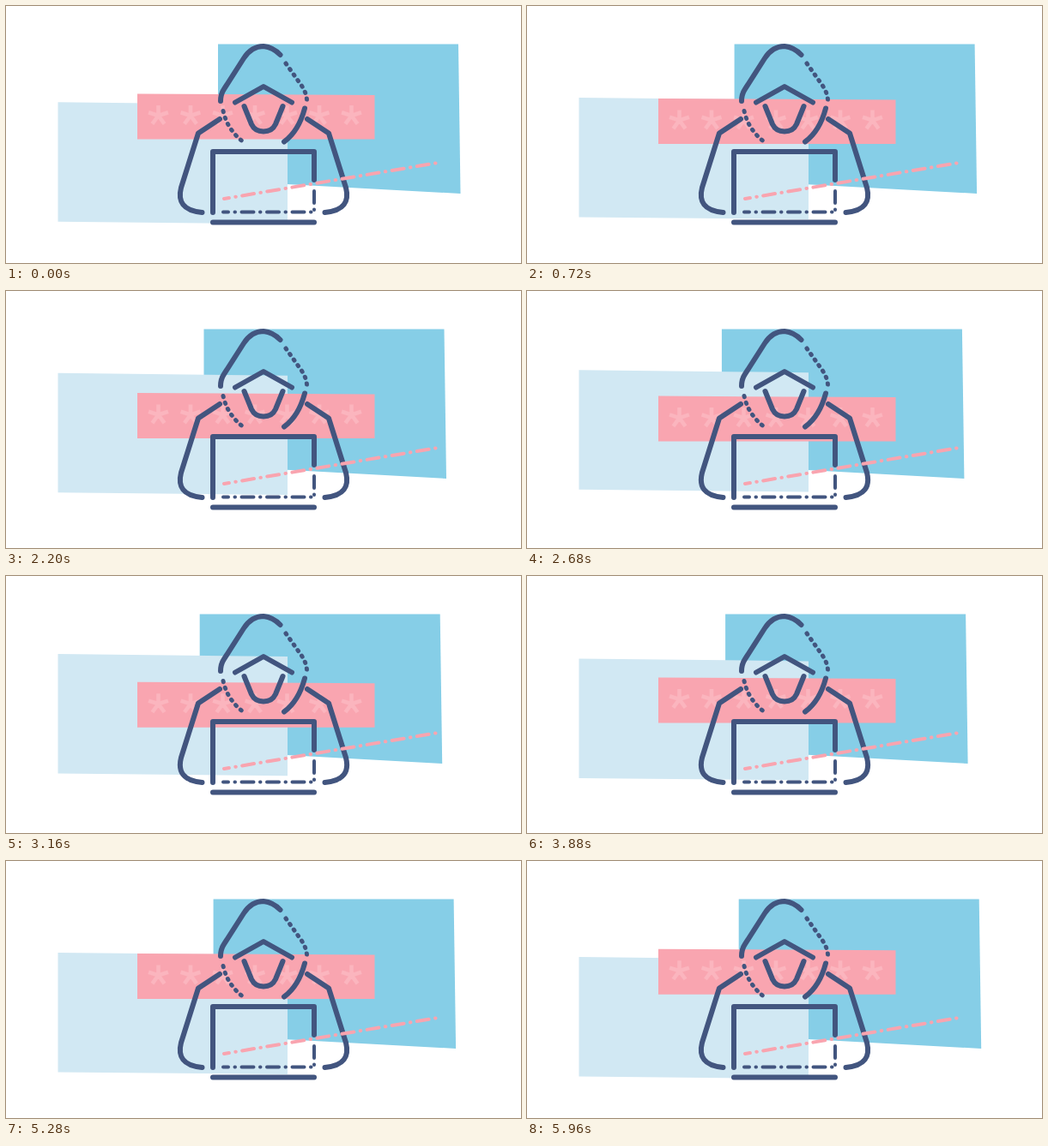
Write an HTML page that moves like this. It is 600x300 px and loops after 6 s.

```html
<!DOCTYPE html>
<html lang="en">
<head>
<meta charset="utf-8">
<title>Hooded figure at a laptop</title>
<style>
  html, body { margin: 0; width: 100%; height: 100%; overflow: hidden; background: #fff; }
  svg { display: block; width: 600px; height: 300px; }
  .ink { fill: none; stroke: #42557f; stroke-width: 6; stroke-linecap: round; stroke-linejoin: round; }
  .dots { stroke-width: 5; stroke-dasharray: 1.2 6.8; }
  .dash { stroke-width: 4; stroke-dasharray: 14 7.5 .5 7.5; }
  .pink { stroke: #f9a4af; }
</style>
</head>
<body>
<svg viewBox="0 0 600 300">
  <path id="blue" fill="#86cee7" d="M247 44.5H527L529.5 219L247 203.5Z"/>
  <path id="pale" fill="#d1e8f3" d="M60.5 112.3L328 115.3V254.5L60.5 251.8Z"/>
  <g id="bar">
    <path fill="#f9a5b0" d="M153 102.5L429.5 104V155.5H153Z"/>
    <path id="stars" fill="none" stroke="#fbb5be" stroke-width="4.6"/>
  </g>
  <g class="ink">
    <path d="M250 111Q250 103 254 97L277 61Q286 47 300 47Q311 48 319.500 57"/>
    <path class="dots" d="M326 67L343 91Q351 102 350.500 112"/>
    <path d="M348 119.500Q341 146 324 158.500"/>
    <path class="dots" d="M253 122.500Q258 145 277 159"/>
    <path d="M267 112.500L300 94L333 112.500"/>
    <path d="M277.500 117L286 138Q290 146.500 300 146.500Q310 146.500 314 138L322.500 117"/>
    <path d="M249 132L224 148.500L204 212C200 228 206 239 228.500 241"/>
    <path d="M351 132L376 148.500L396 212C400 228 394 239 371.500 241"/>
    <path d="M241 241V170H359V203"/>
    <path d="M241 252.500H359"/>
  </g>
  <path class="ink dash" d="M359 216V240.500" stroke-dashoffset="0"/>
  <path class="ink dash" d="M253 240.500H358" stroke-dashoffset="8"/>
  <path class="ink dash pink" d="M254 225L503 183" stroke-dashoffset="8"/>
</svg>
<script>
  const LOOP = 6000, STEP = 40, TRAVEL = 22.5;
  const el = id => document.getElementById(id);

  // Seven five-armed asterisks along the bar
  let d = "";
  for (let i = 0; i < 7; i++) {
    const x = 177.5 + i * 37.5;
    for (let k = 0; k < 5; k++) {
      const a = k * Math.PI * 0.4 - Math.PI / 2;
      d += `M${x} 128l${12 * Math.cos(a)} ${12 * Math.sin(a)}`;
    }
  }
  el("stars").setAttribute("d", d);

  const move = (id, x, y) => el(id).setAttribute("transform", `translate(${x} ${y})`);

  function draw(now) {
    const t = Math.floor(now % LOOP / STEP) * STEP;
    const shift = TRAVEL * (1 - Math.abs(1 - 2 * t / LOOP));
    move("blue", -shift, 0);
    move("pale", 0, -shift);
    move("bar", 0, shift);
    requestAnimationFrame(draw);
  }
  draw(0);
</script>
</body>
</html>
```
